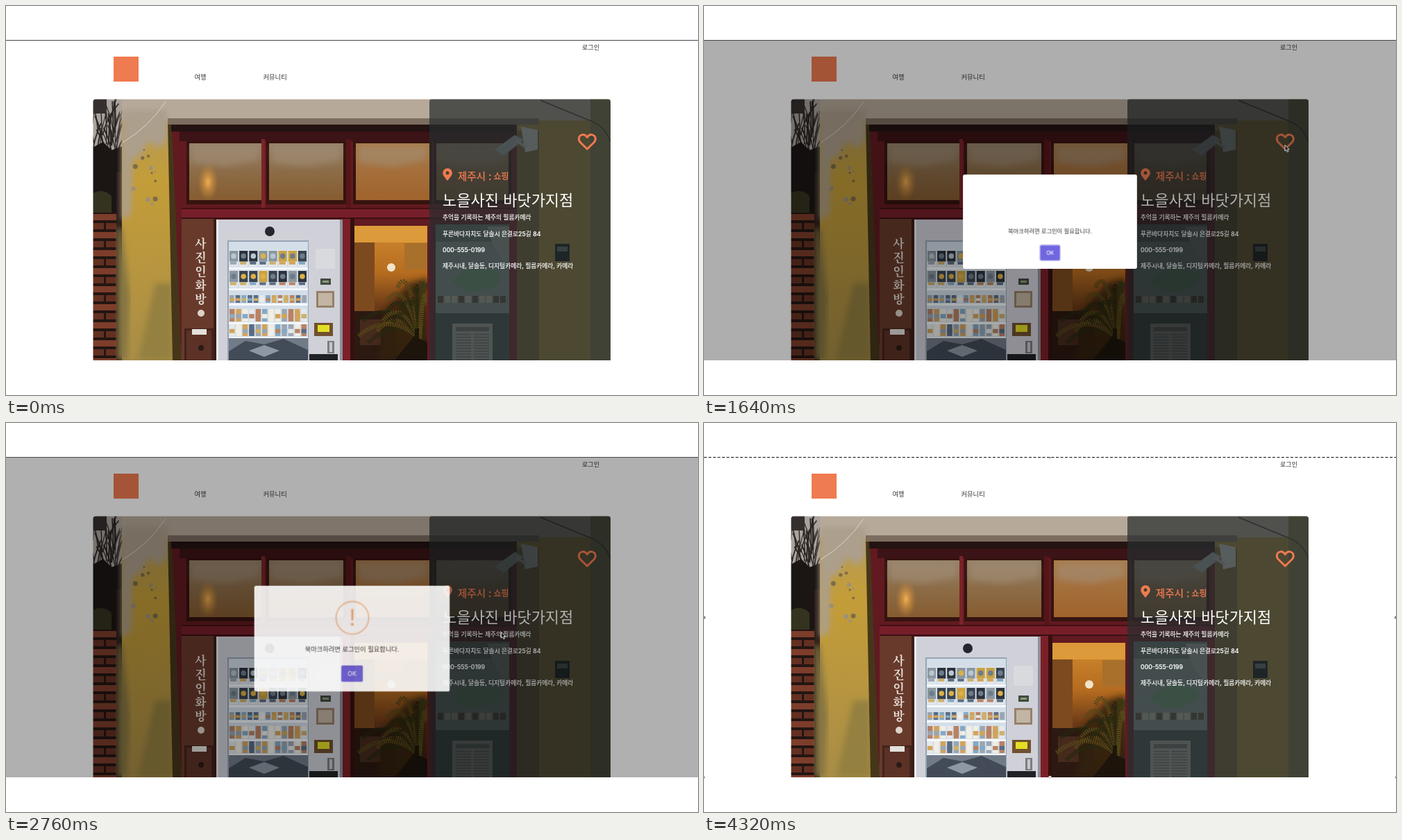
An HTML page for the animation above (4800 ms loop, 997x561 px).

```html
<!DOCTYPE html>
<html lang="ko">
<head>
<meta charset="utf-8">
<title>북마크</title>
<style>
  html, body { margin: 0; width: 100%; height: 100%; overflow: hidden; background: #fff; }
  body { position: relative; font-family: Inter, "Noto Sans CJK KR", "Noto Sans CJK", sans-serif; }
  svg { position: absolute; left: 0; top: 0; width: 997px; height: 561px; }
  .nav { font-size: 9.3px; fill: #333; }
  .info { font-size: 8.74px; font-weight: 500; fill: #fff; stroke: #fff; stroke-width: .2px; }
  .place { fill: #f07b50; stroke: #f07b50; stroke-width: .3px; font-weight: 500; }
  .sign { font-size: 17px; font-weight: 600; fill: #e6dfd8; text-anchor: middle; font-family: "Noto Serif CJK KR", "Noto Sans CJK KR", sans-serif; }

  #shade, #modal, #icon, #mark, #ok, #cursor, #arrow, #beam, #crop {
    animation: 4.8s ease infinite;
  }
  #shade { position: absolute; left: 0; top: 50px; width: 997px; height: 461px; background: #000; animation-name: shade; }
  #modal { position: absolute; left: 349px; top: 229.5px; width: 299px; height: 162px; border-radius: 3px; background: #fff; animation-name: modal; }
  #icon {
    position: absolute; left: 123.5px; top: 23px; width: 52px; height: 52px; box-sizing: border-box;
    border: 2.6px solid #f6c79e; border-radius: 50%; animation-name: icon;
  }
  #mark {
    position: absolute; inset: 0; font-size: 35px; line-height: 47px; text-align: center;
    color: #f3b77f; animation-name: mark;
  }
  #msg { position: absolute; left: 0; right: 0; top: 89px; font-size: 9.85px; line-height: 16px; text-align: center; color: #333; white-space: nowrap; }
  #ok {
    position: absolute; left: 133px; top: 122px; width: 33px; height: 25px; border-radius: 2px;
    font-size: 9.2px; font-weight: 500; line-height: 25px; text-align: center; color: #fff; background: #7066e0;
    animation-name: ring;
  }
  #cursor { animation-name: move; }
  #arrow { animation-name: arrow; }
  #beam { animation-name: beam; }
  #crop { animation-name: crop; }

  @keyframes shade {
    0%, 33.17% { opacity: 0; visibility: hidden; }
    34.16% { visibility: hidden; }
    34.165% { visibility: visible; }
    35.25%, 57.167% { opacity: .4; }
    59.25%, 100% { opacity: 0; }
  }
  @keyframes modal {
    0%, 33.5% { transform: scale(.7); visibility: hidden; }
    34.16% { visibility: hidden; }
    34.165% { visibility: visible; }
    36.31% { transform: scale(1.05); }
    38.5% { transform: scale(.95); }
    39.75%, 57.167% { transform: none; opacity: 1; visibility: visible; }
    60.29% { transform: scale(.5); opacity: 0; visibility: visible; }
    60.3%, 100% { transform: scale(.5); opacity: 0; visibility: hidden; }
  }
  @keyframes icon {
    0%, 33.5% { transform: rotateX(100deg); opacity: 0; }
    43.92%, 100% { transform: rotateX(0deg); opacity: 1; }
  }
  @keyframes mark {
    0%, 33.5% { transform: rotate(45deg); opacity: 0; }
    36.1% { transform: rotate(-25deg); opacity: .4; }
    38.71% { transform: rotate(15deg); opacity: .8; }
    41.31% { transform: rotate(-5deg); opacity: 1; }
    43.92%, 100% { transform: none; opacity: 1; }
  }
  @keyframes ring {
    0%, 57.1% { box-shadow: 0 0 0 1.6px #b9b5f0; }
    57.2%, 100% { box-shadow: none; }
  }
  @keyframes move {
    0%, 10.83% { transform: translate(838px, 498px); }
    17.5% { transform: translate(843px, 213px); }
    21.67% { transform: translate(850px, 198px); }
    28%, 45.8% { transform: translate(836.5px, 200px); }
    56.25%, 70% { transform: translate(713px, 301px); }
    75.8%, 100% { transform: translate(700px, 51px); }
  }
  @keyframes arrow {
    0%, 10.82% { opacity: 0; }
    10.83%, 60.3% { opacity: 1; }
    60.31%, 70.8% { opacity: 0; }
    70.81%, 75.8% { opacity: 1; }
    75.81%, 100% { opacity: 0; }
  }
  @keyframes beam {
    0%, 60.3% { opacity: 0; }
    60.31%, 70.8% { opacity: 1; }
    70.81%, 100% { opacity: 0; }
  }
  @keyframes crop {
    0%, 76.66% { opacity: 0; }
    76.67%, 100% { opacity: 1; }
  }
</style>
</head>
<body>
<svg viewBox="0 0 997 561">
  <defs>
    <clipPath id="card"><path d="M125.5 511V138q0-3.5 3.5-3.5H867.5q3.5 0 3.5 3.5V511z"/></clipPath>
    <filter id="soft" x="0" y="0" width="1" height="1"><feGaussianBlur stdDeviation=".55"/></filter>
    <filter id="softer"><feGaussianBlur stdDeviation="4"/></filter>
    <pattern id="brick" x="125" y="298" width="38" height="26" patternUnits="userSpaceOnUse">
      <path fill="#231613" d="M0 0h38v26H0z"/>
      <path fill="#7d3d2b" d="M0 2h34v9H0z"/>
      <path fill="#643022" d="M0 15h16v9H0zM19 15h19v9H19z"/>
    </pattern>
    <linearGradient id="wall" x2="0" y2="1">
      <stop offset="0" stop-color="#b59a58"/><stop offset=".25" stop-color="#c39d38"/>
      <stop offset=".6" stop-color="#b8963f"/><stop offset="1" stop-color="#a88d47"/>
    </linearGradient>
    <linearGradient id="door" x2="0" y2="1">
      <stop offset="0" stop-color="#d08a30"/><stop offset=".35" stop-color="#b56c20"/>
      <stop offset=".6" stop-color="#6b3a18"/><stop offset="1" stop-color="#2c170f"/>
    </linearGradient>
    <linearGradient id="pane" x2="0" y2="1">
      <stop offset="0" stop-color="#96826a"/><stop offset=".5" stop-color="#8c6c47"/><stop offset="1" stop-color="#865c30"/>
    </linearGradient>
    <linearGradient id="warm" x2="0" y2="1">
      <stop offset="0" stop-color="#a87a4a"/><stop offset="1" stop-color="#a0632c"/>
    </linearGradient>
    <radialGradient id="glow"><stop offset="0" stop-color="#f2b050"/><stop offset="1" stop-color="#c98432" stop-opacity="0"/></radialGradient>
  </defs>

  <path fill="#444" d="M0 49h997v1H0z"/>
  <rect x="155" y="73" width="36" height="36" fill="#ef7b50"/>
  <text class="nav" x="830" y="63" style="font-size:9.05px">로그인</text>
  <text class="nav" x="271.5" y="106">여행</text>
  <text class="nav" x="370.5" y="106">커뮤니티</text>

  <g clip-path="url(#card)">
    <g id="shop" filter="url(#soft)"></g>
    <path fill="#262e2f" fill-opacity=".71" d="M610 511V138q0-4 4-4H871V511z"/>
  </g>

  <path fill="none" stroke="#f07b50" stroke-width="2.9" stroke-linejoin="round"
    d="M837.3 206.3L827.3 196.5C824 193 825 187.5 829 186C832.5 184.8 835.5 186.5 837.3 189.5C839 186.5 842 184.8 845.5 186C849.6 187.5 850.6 193 847.3 196.5Z"/>
  <path fill="#f07b50" fill-rule="evenodd"
    d="M636 252C632 247 629.3 244 629.3 240.8a6.8 6.8 0 0 1 13.6 0C642.9 244 640 247 636 252zM636 238.2a2.5 2.5 0 1 0 .01 0z"/>
  <text class="place" x="651" y="250.5" font-size="14.5">제주시 :</text>
  <text class="place" x="702.5" y="250" font-size="12">쇼핑</text>
  <text x="629" y="287.6" font-size="22" fill="#fff">노을사진 바닷가지점</text>
  <text class="info" x="629" y="308.3">추억을 기록하는 제주의 필름카메라</text>
  <text class="info" x="629" y="331.5">푸른바다자치도 달솔시 은결로25길 84</text>
  <text class="info" x="629" y="354.8">000-555-0199</text>
  <text class="info" x="629" y="378.3">제주시내, 달솔동, 디지털카메라, 필름카메라, 카메라</text>
</svg>

<div id="shade"></div>
<div id="modal">
  <div id="icon"><div id="mark">!</div></div>
  <div id="msg">북마크하려면 로그인이 필요합니다.</div>
  <div id="ok">OK</div>
</div>

<svg viewBox="0 0 997 561">
  <g id="cursor">
    <path id="arrow" fill="#111" stroke="#fff" stroke-width=".8" d="M.5 .5V9L2.5 7.3L4 10.6L5.5 9.9L4.1 6.8H6.6Z"/>
    <path id="beam" fill="none" stroke="#e8e8e8" d="M-1-4q2 0 2 1.5V4q0 1.5-2 1.5M3-4q-2 0-2 1.5M3 5.5q-2 0-2-1.5"/>
  </g>
  <g id="crop">
    <path stroke="#fff" d="M0 49.5H997"/>
    <path stroke="#111" stroke-dasharray="4 2.5" d="M0 49.5H997"/>
    <g fill="#8a8a8a">
      <circle cx="0" cy="280.5" r="2.3"/><circle cx="997" cy="280.5" r="2.3"/>
      <circle cx="0" cy="511" r="1.5"/><circle cx="997" cy="511" r="1.5"/>
      <circle cx="498.5" cy="50" r="1.3"/><circle cx="498.5" cy="511" r="2.3" fill="#ddd"/>
    </g>
  </g>
</svg>

<script>
  let seed = 7;
  const rand = () => (seed = seed * 16807 % 2147483647) / 2147483647;
  const pick = list => list[Math.floor(rand() * list.length)];
  const box = (x, y, w, h, fill) => `<rect x="${x}" y="${y}" width="${w}" height="${h}" fill="${fill}"/>`;
  const dot = (x, y, r, fill) => `<circle cx="${x}" cy="${y}" r="${r}" fill="${fill}"/>`;
  const line = (d, color, width = 1, extra = '') =>
    `<path d="${d}" fill="none" stroke="${color}" stroke-width="${width}" ${extra}/>`;
  const shape = (d, fill, extra = '') => `<path d="${d}" fill="${fill}" ${extra}/>`;
  const soft = 'filter="url(#softer)"';

  function street() {
    let s = box(125, 134, 43, 377, '#1b1614') + box(125, 134, 43, 76, '#aaa39d');
    for (let i = 0; i < 34; i++) {
      const x = 122 + rand() * 40, y = 145 + rand() * 60, lean = rand() * 44 - 18;
      s += line(`M${x} ${y + 24}Q${x + lean * .2} ${y} ${x + lean} ${y - 22}`, '#2c2623', .8 + rand() * 1.4);
    }
    s += box(125, 134, 20, 21, '#35302e');
    s += shape('M125 204L140 196L152 208L168 202V300H125Z', '#1b1614');
    s += shape('M125 270Q140 262 152 274V298H125Z', '#34331f');
    return s + box(125, 298, 34, 213, 'url(#brick)') + box(159, 240, 9, 271, '#2c1e19');
  }

  function walls() {
    let s = box(167, 134, 704, 60, '#b7a999');
    s += box(167, 165, 84, 346, 'url(#wall)');
    s += shape('M167 150H233V190L220 206L207 194L193 216L182 222L180 300L167 310Z', '#ac9f8c', soft);
    s += shape('M167 320L178 420L174 511H160V320Z', '#857543', soft);
    s += shape('M215 400H240V511H190Z', '#94803f', soft);
    for (let i = 0; i < 12; i++) s += dot(178 + rand() * 42, 205 + rand() * 85, 1 + rand() * 2.5, pick(['#9d907a', '#7d6c4a']));
    s += shape('M233 165H250L253 511H240Z', '#45361a');
    s += line('M168 197Q205 175 230 138', '#ddd3c8');
    s += box(736, 165, 135, 346, '#a98b3c') + box(736, 180, 32, 331, '#7c6634') + box(842, 134, 29, 377, '#85754a');
    return s + shape('M233 162H768V171H233Z', '#7c6d60');
  }

  function frames() {
    let s = shape('M238 171H736V511H253L240 190Z', '#611a20') + box(238, 171, 498, 10, '#231312');
    s += box(250, 181, 486, 14, '#3c1316');
    [[264, 104], [379, 107], [504, 106], [620, 104]].forEach(([x, w], i) => {
      s += box(x - 4, 195, w + 8, 91, '#35130f') + box(x, 198, w, 82, i === 2 ? 'url(#warm)' : 'url(#pane)');
      s += shape(`M${x + 4} 202H${x + w - 4}V222L${x + w / 2} 232L${x + 4} 226Z`, '#a38f78', `${soft} opacity=".55"`);
    });
    s += `<ellipse cx="291" cy="254" rx="15" ry="27" fill="url(#glow)"/>`;
    s += box(368, 192, 5, 100, '#7a2429') + box(490, 192, 7, 100, '#561519');
    return s + box(253, 292, 483, 14, '#761f2a') + box(253, 291, 483, 2, '#421014') + box(253, 305, 483, 2, '#3a1014');
  }

  function sign() {
    let s = box(253, 307, 50, 204, '#683a2b') + box(299, 307, 4, 204, '#3a1d17');
    [...'사진인화방'].forEach((c, i) => { s += `<text class="sign" x="280.5" y="${349 + i * 20}">${c}</text>`; });
    s += dot(281, 443, 5, '#ddd2c8');
    s += box(257, 465, 42, 46, '#43231c') + box(260, 468, 36, 43, '#5c3226');
    return s + box(268, 466, 21, 8, '#e4e1dc') + dot(281, 493, 4, '#2c1a15');
  }

  function product(x, y, w, h, hues) {
    const big = h > 20;
    if (!big) return box(x, y, w, h, pick(hues)) + box(x, y + h * .4, w, h * .35, pick(hues));
    return box(x, y, w, h, '#e3e8ec') + box(x, y + 1, w, h * .65, pick(['#39434f', '#2b323c', '#8a979f', '#c9a240']))
      + dot(x + w / 2, y + h * .36, 3.8, pick(['#dcb047', '#b9c6d0', '#6d7c8b'])) + box(x + 1, y + h * .7, w - 3, 4, pick(hues));
  }

  function machine() {
    const hues = ['#cdb06a', '#5a6c84', '#e6e9ea', '#b98263', '#83a9c4', '#f1eee4', '#9aa6b2', '#d3a35a'];
    let s = box(303, 308, 182, 203, '#cfd0d8') + box(303, 308, 3, 203, '#ececf0') + box(481, 308, 4, 203, '#8f8f9a');
    s += dot(380, 325, 7, '#24262d');
    s += box(319, 338, 117, 173, '#97a4b3') + box(321, 340, 114, 138, '#d3dee9');
    [[352, 24, 8], [381, 25, 8], [417, 11, 13], [437, 18, 12], [459, 17, 12]].forEach(([y, h, n]) => {
      const step = 113 / n;
      for (let i = 0; i < n; i++) s += product(322 + i * step, y, step - 2, h, hues);
      s += box(321, y + h + 1, 114, 3, '#f5f8fb');
    });
    s += box(321, 479, 114, 32, '#717b88') + shape('M321 498L345 483L372 488L400 480L435 496V511H321Z', '#424b57');
    s += shape('M350 497L372 489L394 497L372 506Z', '#8e98a3');
    s += box(446, 350, 28, 29, '#d9dade') + box(453, 393, 15, 9, '#424b41') + box(456, 396, 9, 3, '#899a76');
    s += box(447, 411, 26, 24, '#96816b') + box(450, 414, 20, 18, '#c3b5a3');
    s += box(444, 457, 27, 19, '#70502f') + box(449, 460, 17, 10, '#e3df24');
    s += box(463, 483, 10, 18, '#7b7d82') + box(466, 485, 4, 14, '#c8c8cc');
    return s + box(437, 502, 41, 9, '#202226');
  }

  function door() {
    let s = box(485, 307, 12, 204, '#7b2029') + box(496, 307, 6, 204, '#35100f');
    s += box(502, 317, 105, 194, 'url(#door)') + box(502, 317, 105, 24, '#dc9a3a') + box(502, 341, 29, 100, '#7d4a1f');
    s += shape('M502 440H562V511H502Z', '#2c1912') + box(510, 452, 30, 37, '#462a1c');
    s += box(574, 342, 33, 38, '#a8702b') + dot(555, 377, 6, '#f1e3ca');
    s += shape('M536 511L545 440L580 400L607 392V511Z', '#33240f', `${soft} opacity=".8"`);
    for (let i = 0; i < 18; i++) {
      const a = Math.PI * (.98 + i * .045), r = 48 + rand() * 45;
      const x = Math.min(606, 596 + Math.cos(a) * r), y = 452 + Math.sin(a) * r * .9;
      s += line(`M596 480Q${(596 + x) / 2} ${y - 6} ${x} ${y + 30}`, pick(['#25270f', '#3f3c16', '#564719']), 6, 'stroke-dasharray="1.8 1.3"');
    }
    s += line('M592 511V465', '#1d170c', 6) + shape('M560 511L588 476L607 485V511Z', '#1d140c');
    return s + box(607, 307, 12, 204, '#611a22');
  }

  function shopWindow() {
    let s = box(619, 315, 106, 196, '#66756f') + box(725, 307, 11, 204, '#791e2a');
    s += box(619, 340, 106, 103, '#8a9d99') + shape('M643 398Q658 374 690 379Q722 384 712 397Q691 416 660 410Z', '#6da27b');
    s += shape('M694 318H725V372Q704 364 694 318Z', '#9aa8a4');
    for (let i = 0; i < 10; i++) s += box(622 + i * 10, 418, 8, 10, pick(['#c9c5ad', '#594b3a', '#8b8f91']));
    s += box(619, 443, 106, 68, '#465350') + box(643, 458, 58, 53, '#b4b3a9') + box(648, 463, 48, 6, '#737573');
    for (let y = 473; y < 511; y += 4) s += box(648, y, 22, 1.5, '#777') + box(674, y, 22, 1.5, '#777');
    s += shape('M742 174L766 179V207L748 211Z', '#d0d2d0') + shape('M704 207L733 186L746 193L717 216Z', '#a1aaac');
    s += line('M735 194L750 204', '#b8babb', 4) + line('M770 136L838 164Q862 171 871 196', '#393b39', 1.5);
    return s + box(791, 343, 21, 25, '#0c1010') + box(794, 347, 15, 7, '#68706e');
  }

  document.getElementById('shop').innerHTML =
    [street, walls, frames, sign, machine, door, shopWindow].map(draw => draw()).join('');
</script>
</body>
</html>
```
